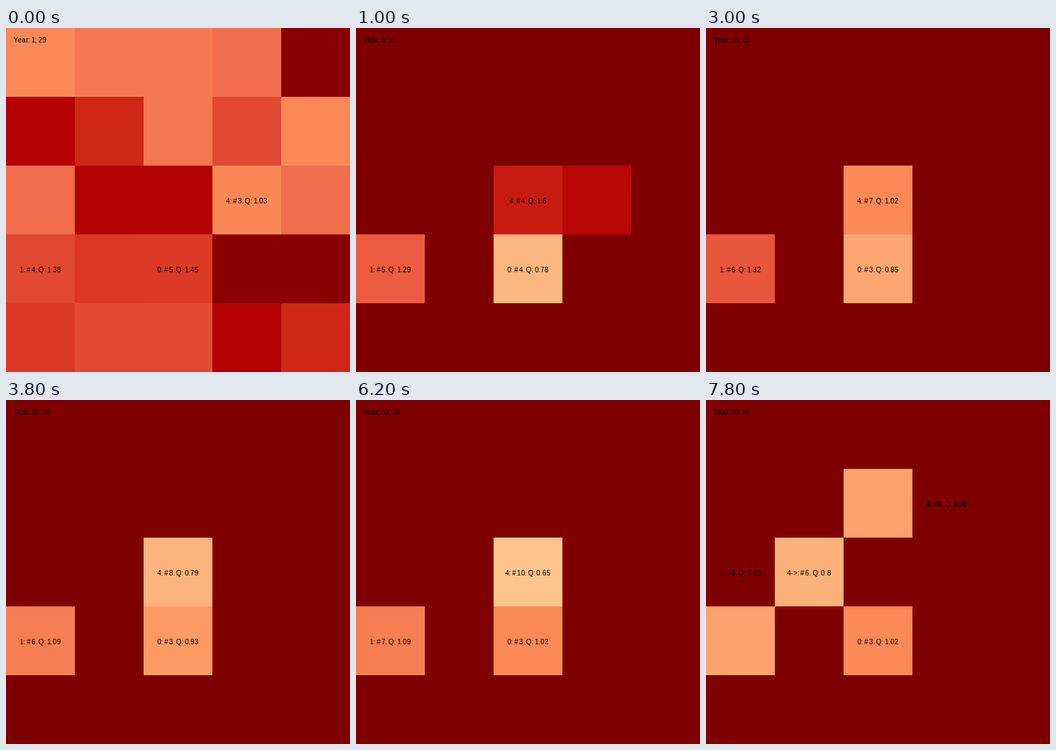
A matplotlib script for the animation above (8 s loop, 500x500 px).

```python
import numpy as np
import matplotlib.pyplot as plt
from matplotlib.animation import FuncAnimation

SIZE, CELL, DPI = 500, 100, 100
YEARS, SPLIT = 40, 33
SPREAD, REGROWTH = 1.36, 1.25  # yearly growth of wild and of abandoned fields
THIN = r"$\,$"

plt.rcParams["font.family"] = "Liberation Sans"
FONT = 10.2 * 72 / DPI

# Stock of each field in the first year, in percent
START = np.array([
    [51, 56, 56, 60, 97],
    [87, 77, 56, 69, 51],
    [60, 87, 87, 51, 60],
    [69, 73, 73, 97, 97],
    [73, 69, 69, 87, 77],
]) / 100

# Where each group lives, with key points (year, quality) of its stay
STAYS = [
    ("0", 3, 2, [(1, 1.45), (3, 0.81), (6, 0.78), (13, 0.8), (20, 0.93), (32, 1.02), (40, 1.02)]),
    ("1", 3, 0, [(1, 1.38), (3, 1.49), (6, 1.29), (13, 1.52), (20, 1.09), (32, 1.09), (39, 0.7)]),
    ("1", 2, 0, [(40, 7.33)]),
    ("4", 2, 3, [(1, 1.03), (2, 0.7)]),
    ("4", 2, 2, [(3, 2.78), (6, 1.6), (13, 1.23), (20, 0.79), (32, 0.65)]),
    ("4", 1, 2, [(SPLIT, 7.5), (39, 0.7)]),
    ("4", 1, 3, [(40, 9.08)]),
    ("4->", 2, 1, [(SPLIT, 8.2), (40, 0.8)]),
]


def heads(name, year):
    """Group 0 shrinks, the others grow; group 4 halves when it splits."""
    if name == "0":
        return max(3, round(5 - 0.1 * year))
    if name == "1":
        return round(4.4 + 0.08 * year)
    if year < SPLIT:
        return round(3.15 + 0.22 * year)
    return round(5 + 0.1 * (year - SPLIT))


def quality(points, year):
    years, values = zip(*points)
    return float(np.exp(np.interp(year, years, np.log(values))))


def world(year):
    """Field stocks and the labels of the groups living on them."""
    stock = START * SPREAD ** (year - 1)
    labels = []
    for name, row, col, points in STAYS:
        first, last = points[0][0], points[-1][0]
        if year < first:
            continue
        q = quality(points, year)
        stock[row, col] = q / 2 * REGROWTH ** max(0, year - last)
        if year <= last:
            text = f"{name}: # {heads(name, year)}. Q: {round(q, 2)}"
            labels.append((row, col, text))
    return np.minimum(stock, 1), labels


def tighten(text):
    return text.replace(" ", THIN)


fig = plt.figure(figsize=(SIZE / DPI, SIZE / DPI), dpi=DPI)
ax = fig.add_axes([0, 0, 1, 1])
ax.axis("off")
field = ax.imshow(START, cmap="OrRd", vmin=0, vmax=1, interpolation="nearest",
                  extent=(0, SIZE, SIZE, 0), aspect="auto")
ax.set(xlim=(0, SIZE), ylim=(SIZE, 0))

clock = ax.text(10, 20, "", size=FONT, ha="left", va="baseline")
tags = [ax.text(0, 0, "", size=FONT, ha="center", va="baseline") for _ in range(4)]


def draw(i):
    year = i + 1
    stock, labels = world(year)
    field.set_data(stock)
    clock.set_text(tighten(f"Year: {year}; 29"))
    for tag in tags:
        tag.set_text("")
    for tag, (row, col, text) in zip(tags, labels):
        tag.set_position(((col + 0.5) * CELL, (row + 0.5) * CELL + 5))
        tag.set_text(tighten(text))
    return [field, clock, *tags]


anim = FuncAnimation(fig, draw, frames=YEARS, interval=200, repeat=True, repeat_delay=0)
plt.show()
```
